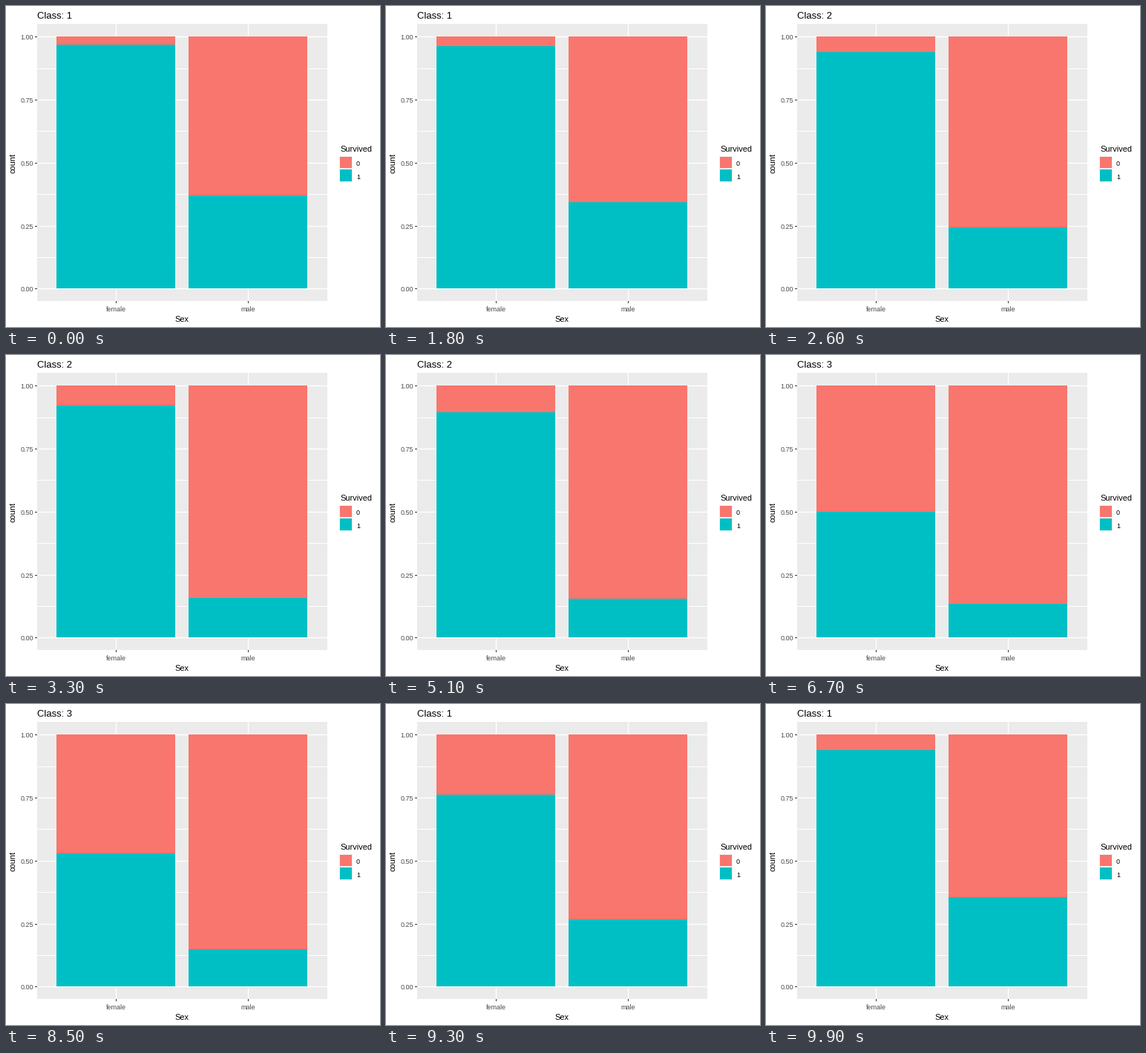
Animation of 504x432 px, one loop 10000 ms. Source, as a matplotlib script:

```python
import matplotlib.pyplot as plt
from matplotlib.animation import FuncAnimation
from matplotlib.patches import Rectangle

W, H, DPI = 504, 432, 72
FRAMES, INTERVAL = 100, 100
RED, TEAL = "#F8766D", "#00BFC4"
PANEL, KEY = "#EBEBEB", "#F2F2F2"
TICK, LABEL = "#333333", "#4D4D4D"

# Survival share per class: (female, male)
SHARES = [(91 / 94, 45 / 122), (70 / 76, 17 / 108), (72 / 144, 47 / 347)]
# Each morph: last still frame, frame of arrival
MORPHS = [(16, 33), (50, 67), (84, 100)]
TITLE_DELAY = 9

X0, X1, Y0, Y1 = 42, 433, 24, 397
BASE, TOP, SPAN = 380, 41, 339
BARS = [68, 246]
BAR_W = 160

plt.rcParams["font.family"] = "Liberation Sans"
fig = plt.figure(figsize=(W / DPI, H / DPI), dpi=DPI, facecolor="white")
ax = fig.add_axes([0, 0, 1, 1])
ax.set_xlim(0, W)
ax.set_ylim(H, 0)
ax.axis("off")


def rect(x, y, w, h, color, z=1, snap=None):
    patch = Rectangle((x, y), w, h, facecolor=color, linewidth=0, zorder=z, snap=snap)
    return ax.add_patch(patch)


def text(x, y, s, size, color="black", ha="left", **kw):
    return ax.text(x, y, s, fontsize=size, color=color, ha=ha,
                   va=kw.pop("va", "baseline"), **kw)


def row(value):
    return round(BASE + 0.3 - SPAN * value)


def draw_panel():
    rect(X0, Y0, X1 - X0, Y1 - Y0, PANEL, 0)
    for k in range(4):
        rect(X0, row(0.125 + k / 4), X1 - X0, 1, "white")
    for k in range(5):
        y = row(k / 4)
        rect(X0, y - 0.2, X1 - X0, 1.4, "white", snap=False)
        rect(X0 - 3, y, 3, 1, TICK)
        text(37, y + 4.3, f"{k / 4:.2f}", 9, LABEL, "right")
    for x, name in zip(BARS, ("female", "male")):
        mid = x + BAR_W // 2
        rect(mid - 0.2, Y0, 1.4, Y1 - Y0, "white", snap=False)
        rect(mid, Y1, 1, 3, TICK)
        text(mid + 0.3, 411, name, 9, LABEL, "center")
    text(236.5, 425, "Sex", 11, ha="center")
    text(15, 211.5, "count", 11, ha="right", va="center", rotation=90)


def draw_legend():
    text(450, 196, "Survived", 11)
    rect(449, 202, 18, 35, KEY)
    rect(450, 203, 16, 15, RED, 2)
    rect(450, 220, 16, 16, TEAL, 2)
    text(472, 215, "0", 9)
    text(472, 233, "1", 9)


def state(frame):
    """Return the two shares and the class number shown at a frame."""
    for i, (start, end) in enumerate(MORPHS):
        if frame <= start:
            return SHARES[i], i + 1
        if frame < end:
            nxt = (i + 1) % 3
            t = (frame - start) / (end - start)
            mix = [a + (b - a) * t for a, b in zip(SHARES[i], SHARES[nxt])]
            return mix, (nxt if frame - start >= TITLE_DELAY else i) + 1
    return SHARES[0], 1


draw_panel()
draw_legend()
title = text(42, 17, "", 13)
for x in BARS:
    rect(x, TOP, BAR_W, BASE - TOP, RED, 3)
fills = [rect(x, BASE, BAR_W, 0, TEAL, 4) for x in BARS]


def update(frame):
    shares, number = state(frame)
    for fill, share in zip(fills, shares):
        y = round(BASE + 0.5 - SPAN * share)
        fill.set_y(y)
        fill.set_height(BASE - y)
    title.set_text(f"Class: {number}")
    return [*fills, title]


anim = FuncAnimation(fig, update, frames=FRAMES, interval=INTERVAL,
                     repeat=True, repeat_delay=0, blit=False)
plt.show()
```
